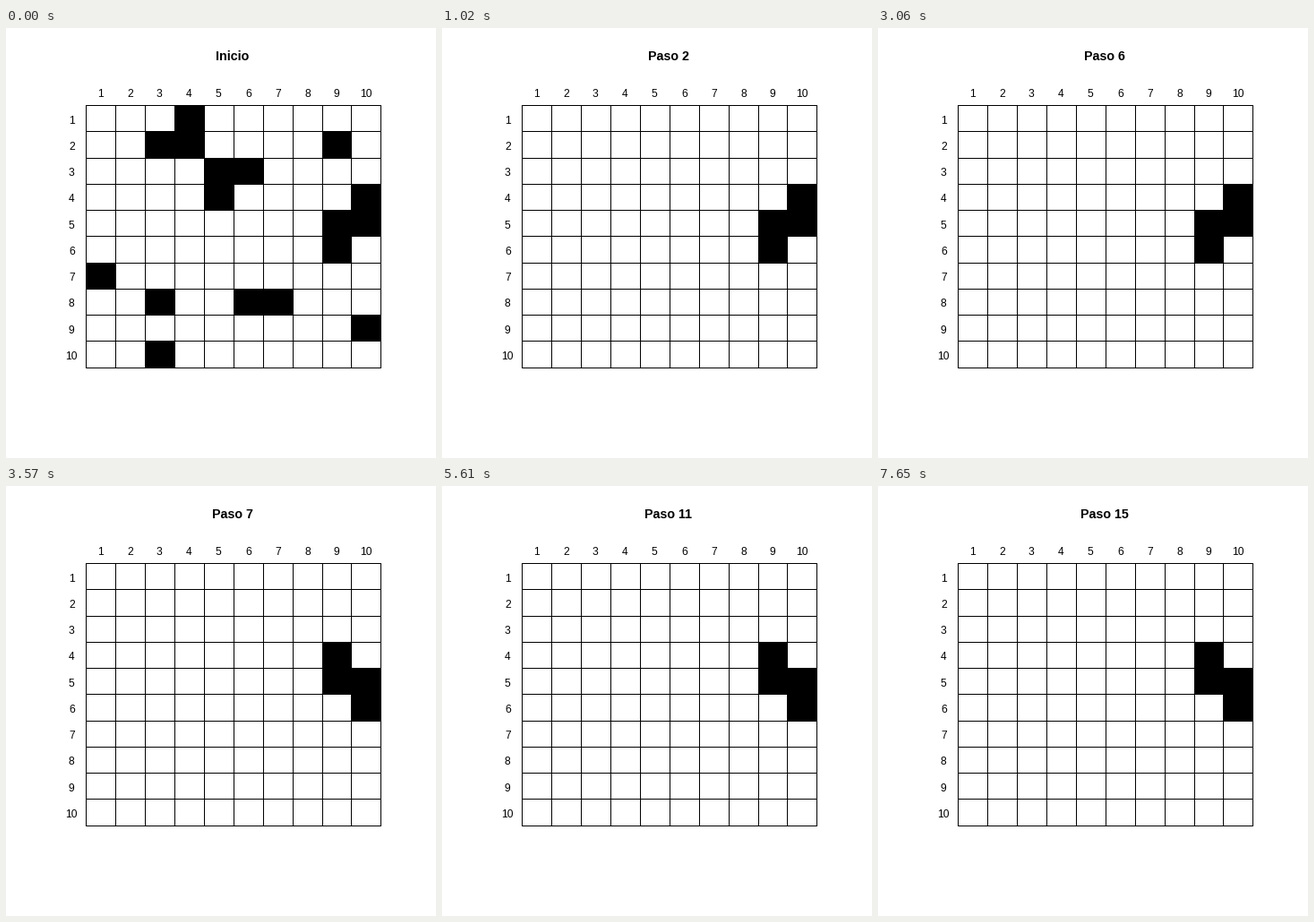
These frames come from a looping animation (480x480 px, 8160 ms). A matplotlib script:

```python
import matplotlib.pyplot as plt
import numpy as np
from matplotlib.animation import FuncAnimation
from matplotlib.patches import Rectangle

STAGE = 480
N = 10
STEPS = 16
STEP_MS = 510
LEFT, TOP = 59.04, 59.04            # plot region origin in pixels
CELL_W, CELL_H = 390.72 / 11.88, 347.52 / 11.88

START = {1: [4], 2: [3, 4, 9], 3: [5, 6], 4: [5, 10], 5: [9, 10],
         6: [9], 7: [1], 8: [3, 6, 7], 9: [10], 10: [3]}


def px(u):
    return LEFT + (u + 0.44) * CELL_W


def py(v):
    return TOP + (v + 0.44) * CELL_H


def evolve(cells):
    """A cell is alive next step exactly when it has three live neighbours."""
    padded = np.pad(cells, 1)
    total = sum(padded[r:r + N, c:c + N] for r in range(3) for c in range(3))
    return (total - cells == 3).astype(int)


first = np.zeros((N, N), int)
for row, cols in START.items():
    first[row - 1, np.array(cols) - 1] = 1
states = [first]
for _ in range(STEPS - 1):
    states.append(evolve(states[-1]))

plt.rcParams["font.family"] = "Liberation Sans"
fig = plt.figure(figsize=(STAGE / 72, STAGE / 72), dpi=72, facecolor="white")
ax = fig.add_axes([0, 0, 1, 1])
ax.set_xlim(0, STAGE)
ax.set_ylim(STAGE, 0)
ax.axis("off")


def block(x0, y0, x1, y1):
    return ax.add_patch(Rectangle((x0, y0), x1 - x0, y1 - y0,
                                  facecolor="black", linewidth=0))


def label(text, center_x, center_y):
    x = np.floor(center_x - 3.5 * len(text))
    ax.text(x, round(center_y + 5.5), text, fontsize=12, va="baseline")


xs = [int(px(k + 0.5)) for k in range(N + 1)]
ys = [int(py(k + 0.5)) for k in range(N + 1)]

for x in xs:
    block(x, ys[0], x + 1, ys[-1] + 1)
for y in ys:
    block(xs[0], y, xs[-1] + 1, y + 1)

for k in range(1, N + 1):
    label(str(k), px(k), py(0))
    label(str(k), px(0), py(k))

cells = [[block(xs[c], ys[r], xs[c + 1] + 1, ys[r + 1] + 1)
          for c in range(N)] for r in range(N)]
title = ax.text(234, 36, "Inicio", fontsize=14.3, fontweight="bold",
                va="baseline")


def draw(step):
    for r in range(N):
        for c in range(N):
            cells[r][c].set_visible(bool(states[step][r, c]))
    title.set_text(f"Paso {step}" if step else "Inicio")
    title.set_x(234 if step == 0 else 230 if step < 10 else 226)
    return [title]


anim = FuncAnimation(fig, draw, frames=STEPS, interval=STEP_MS,
                     repeat=True, repeat_delay=0)
plt.show()
```
